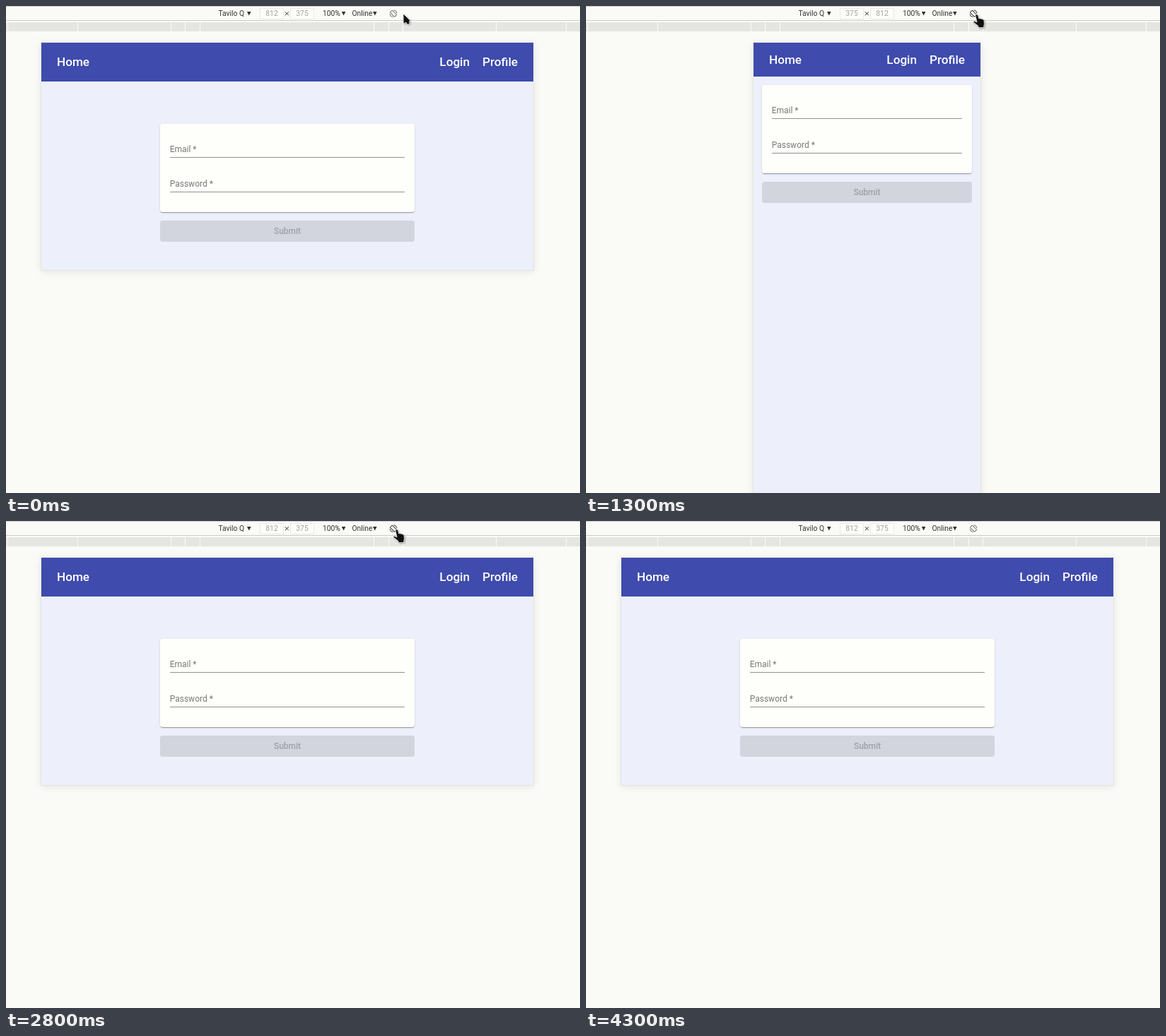
These frames come from a looping animation (812 by 690 pixels, 4700 ms). An HTML page:

```html
<!DOCTYPE html>
<html lang="en">
<head>
<meta charset="utf-8">
<title>Rotating a device preview</title>
<style>
  html, body { margin: 0; width: 100%; height: 100%; overflow: hidden; background: #fafaf6; }
  body { position: relative; font-family: Roboto, sans-serif; }
  div, span, svg { position: absolute; box-sizing: border-box; white-space: nowrap; }
  #chrome { left: 0; top: 0; font-size: 10.3px; fill: #333; }
  #device, #page { left: 50px; top: 52px; width: 696px; height: 322px; }
  #device { background: #fefffb; box-shadow: 0 0 0 1px #e4e5e2, 0 2px 11px rgba(0,0,0,.1); }
  #page { background: #edf0fa; --card: 115px; --inset: 168px; --bar: 55px; }
  #device.tall, #page.tall { left: 237px; width: 321px; height: 696px; }
  #page.tall { --card: 60px; --inset: 12px; --bar: 48px; }
  #bar { width: 100%; height: var(--bar); line-height: var(--bar); background: #3f4bad;
         color: #fff; font-size: 17.14px; font-weight: 500; }
  #card, #submit { left: var(--inset); right: var(--inset); border-radius: 3.4px; }
  #card { top: var(--card); height: 125px; background: #fefffb;
          box-shadow: 0 2px 1px -1px rgba(0,0,0,.2), 0 1px 1px rgba(0,0,0,.14), 0 1px 3px rgba(0,0,0,.12); }
  .field { left: 13.7px; right: 13.7px; height: 24px; line-height: 24px; font-size: 12px;
           color: #777874; border-bottom: 1px solid #91928e; }
  #submit { top: calc(var(--card) + 137px); height: 30px; line-height: 31px; background: #d2d5de;
            color: #9da0a8; text-align: center; font-size: 12px; font-weight: 500; }
</style>
</head>
<body>
<div id="device"></div>
<div id="page">
  <div id="bar">
    <span style="left:22px">Home</span>
    <span style="right:90px">Login</span>
    <span style="right:22px">Profile</span>
  </div>
  <div id="card">
    <div class="field" style="top:24px">Email *</div>
    <div class="field" style="top:73px">Password *</div>
  </div>
  <div id="submit">Submit</div>
</div>

<svg id="chrome" width="812" height="690" viewBox="0 0 812 690">
  <path d="M0 .5H812M0 20.5H812" stroke="#cbccc8"/>
  <path d="M0 23H812V36H0Z" fill="#e5e6e1"/>
  <path d="M2.5 23v13m99-13v13m132-13v13m20-13v13m21-13v13m246-13v13m21-13v13m20-13v13m132-13v13m99-13v13" stroke="#fafaf6"/>
  <path d="M359.5 3.5h33v15h-33zM402.5 3.5h33v15h-33z" fill="#fdfdfa" stroke="#e9e9e5"/>
  <text x="300.5" y="14">Tavilo Q</text>
  <text x="448" y="14">100%</text>
  <text x="489.5" y="14">Online</text>
  <g text-anchor="middle">
    <text id="wide" x="376" y="14" fill="#a1a19e"></text>
    <text id="high" x="419" y="14" fill="#a1a19e"></text>
  </g>
  <path d="M394.8 8.2l5 5m0-5l-5 5" stroke="#333"/>
  <path d="M341 8h5.6l-2.8 5.4zM474.8 8h5.6l-2.8 5.4zM519 8h5.6l-2.8 5.4z"/>
  <g id="icon" transform="translate(548 10.7)" fill="none">
    <rect x="-2.2" y="-4.5" width="4.4" height="9" rx=".8" transform="rotate(-45)"/>
    <path d="M.5 -5A5 5 0 0 1 5 -.5M-.5 5A5 5 0 0 1 -5 .5"/>
  </g>
  <g id="cursor" stroke="#fff" stroke-width=".7" fill="#111" style="filter:drop-shadow(1px 1px 1px rgba(0,0,0,.35))">
    <path id="arrow" d="M0 0L9.8 9.5L8.6 10.6L9 14.6L5.5 15L4 12.2L.2 14Z"/>
    <path id="hand" d="M0 1.6Q.2-.3 2-.1Q3.2 .1 3.6 1.6L4.8 6Q6.6 5.1 7.6 6.2Q9.2 5.5 10 6.9Q11.8 6.6 12 8.5L12.4 13L11.5 18.6H4.3L3.6 16L-2.6 11.2Q-3.8 9.6-1.8 9.2L2 11Z"/>
  </g>
</svg>

<script>
const $ = id => document.getElementById(id);
const LOOP = 4700;
const show = (id, on) => $(id).style.display = on ? "" : "none";

// The pointer advances in steps of 100 ms.
function pointer(t) {
  const step = Math.floor(t / 100);
  if (step < 5) return [562, 11];
  if (step < 9) return [562 - 2.75 * (step - 4), 11 + .25 * (step - 4)];
  if (step < 38) return [551, 12];
  const u = Math.min(1, (step - 38) / 3);
  return [553 - 389 * u, 11 + 4 * u + 122 * u * (1 - u)];
}

function draw(t) {
  const [x, y] = pointer(t);
  const tall = t >= 1300 && t < 2700;
  const hand = t >= 700 && t < 3800;
  $("device").className = tall ? "tall" : "";
  $("page").className = t >= 1300 && t < 2800 ? "tall" : "";
  $("wide").textContent = tall ? 375 : 812;
  $("high").textContent = tall ? 812 : 375;
  $("icon").setAttribute("stroke", t >= 600 && t < 3900 ? "#333" : "#70716e");
  $("cursor").setAttribute("transform", `translate(${x} ${y})`);
  show("cursor", t < 4300);
  show("arrow", !hand);
  show("hand", hand);
}

function tick() {
  draw(performance.now() % LOOP);
  requestAnimationFrame(tick);
}
tick();
</script>
</body>
</html>
```
